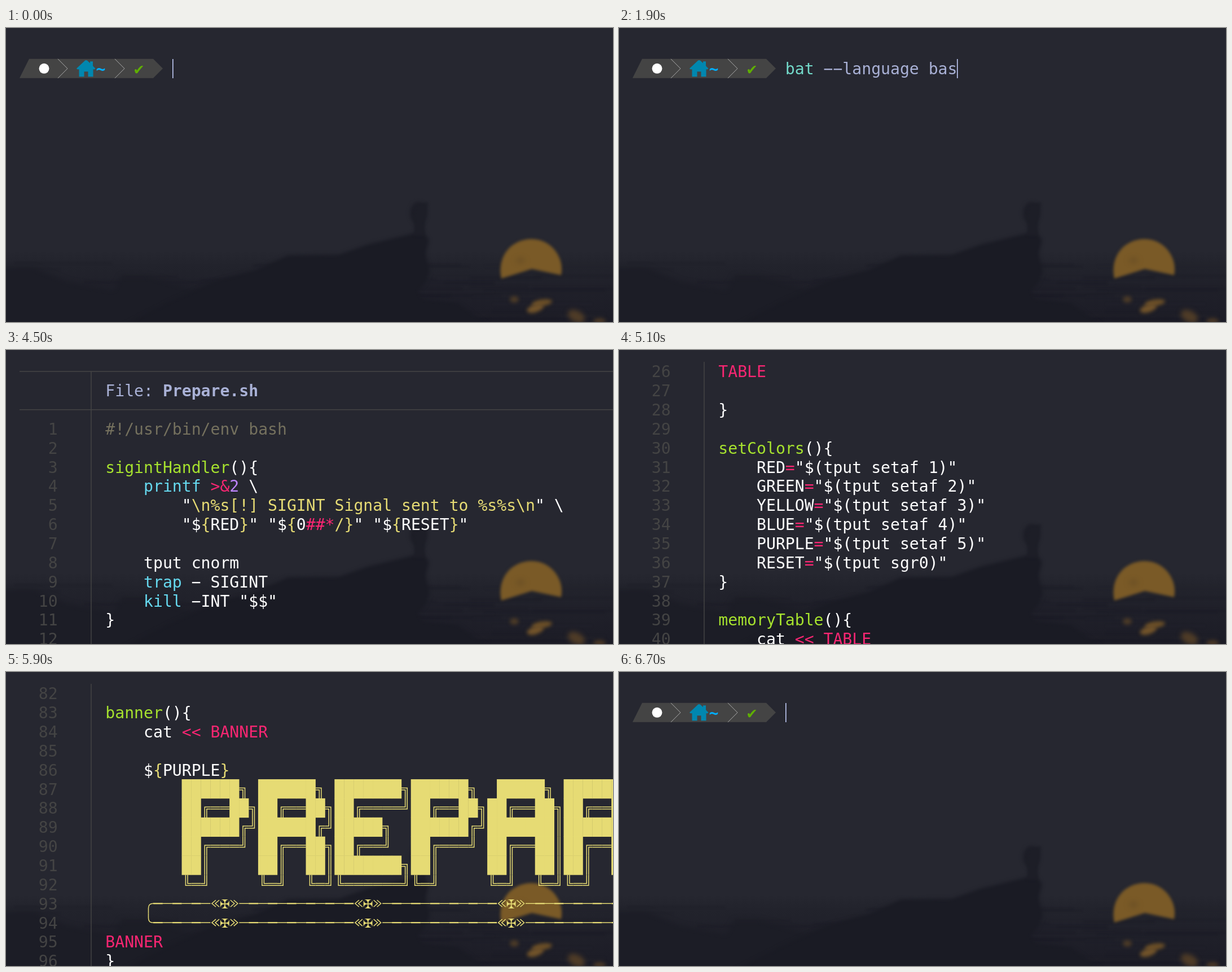
An HTML page with a canvas for the animation above (7600 ms loop, 1076 by 521 pixels).

```html
<!DOCTYPE html>
<html lang="en">
<head>
<meta charset="utf-8">
<title>Terminal</title>
<style>
html, body { margin: 0; width: 100%; height: 100%; overflow: hidden; background: #262730; }
canvas { display: block; }
</style>
</head>
<body>
<canvas id="stage" width="1076" height="521"></canvas>
<script>
const ctx = document.getElementById("stage").getContext("2d");
const WIDTH = 1076, HEIGHT = 521, LOOP = 7600;
const LEFT = 24, TOP = 21, CELL = 16.925, ROW = 33.85;
const FONT = '28.12px "DejaVu Sans Mono", monospace';
const FG = "#a9b1d6", GREY = "#444444";
const COLORS = {
  w: "#ffffff", y: "#e6db74", g: "#a6e22e", c: "#66d9ef", p: "#f92672",
  v: "#be84ff", k: "#75715e", n: GREY, f: FG, t: "#73daca", r: "#f7768e", o: "#5fd700"
};
const colX = col => LEFT + col * CELL;
const rowY = row => TOP + row * ROW;

// ---- Box drawing -------------------------------------------------------

const CORNERS = { "╔": [1, 1], "╗": [-1, 1], "╚": [1, -1], "╝": [-1, -1] };
const TEES = { "╠": 1, "╣": -1 };
const GAP = 1.8;

function stroke(points, width = 1.5) {
  ctx.lineWidth = width;
  ctx.beginPath();
  points.forEach(([x, y]) => ctx.lineTo(x, y));
  ctx.stroke();
}

function drawSymbol(ch, x, y) {
  const cx = x + CELL / 2, cy = y + ROW / 2, right = x + CELL, bottom = y + ROW;
  const bend = (sx, sy, d) => stroke([
    [cx + sx * CELL / 2, cy + sy * d], [cx + sx * d, cy + sy * d], [cx + sx * d, cy + sy * ROW / 2]
  ]);
  if (CORNERS[ch]) {
    bend(...CORNERS[ch], GAP);
    bend(...CORNERS[ch], -GAP);
  } else if (TEES[ch]) {
    const side = TEES[ch];
    bend(side, 1, GAP);
    bend(side, -1, GAP);
    stroke([[cx - side * GAP, y], [cx - side * GAP, bottom]]);
  } else if (ch === "═") {
    for (const d of [-GAP, GAP]) stroke([[x, cy + d], [right, cy + d]]);
  } else if (ch === "║") {
    for (const d of [-GAP, GAP]) stroke([[cx + d, y], [cx + d, bottom]]);
  } else if (ch === "█") {
    ctx.fillRect(x - 0.2, y - 0.2, CELL + 0.4, ROW + 0.4);
  } else if (ch === "─" || ch === "━") {
    stroke([[x, cy], [right, cy]], ch === "─" ? 1.5 : 2.3);
  } else if (ch === "╭" || ch === "╰") {
    const s = ch === "╭" ? 1 : -1;
    ctx.lineWidth = 1.5;
    ctx.beginPath();
    ctx.moveTo(right, cy);
    ctx.quadraticCurveTo(cx, cy, cx, cy + s * 8);
    ctx.lineTo(cx, cy + s * ROW / 2);
    ctx.stroke();
  } else if (ch === "≪" || ch === "≫") {
    const s = ch === "≪" ? 1 : -1;
    for (const d of [-6, 0]) {
      stroke([[cx + s * (d + 7), cy - 6], [cx + s * d, cy], [cx + s * (d + 7), cy + 6]]);
    }
  } else if (ch === "✠") {
    ctx.font = '22px "DejaVu Sans", sans-serif';
    ctx.textAlign = "center";
    ctx.fillText(ch, cx, cy + 8.5);
    ctx.textAlign = "left";
  }
}

// "^x" switches to colour x; every glyph sits in its terminal cell.
function drawText(markup, col, row, weight = "") {
  const font = weight + " " + FONT;
  ctx.font = font;
  for (let i = 0; i < markup.length; i++) {
    let ch = markup[i];
    if (ch === "^") {
      ctx.fillStyle = ctx.strokeStyle = COLORS[markup[++i]];
      continue;
    }
    const x = colX(col++), y = rowY(row);
    if (ch === " ") continue;
    if ("╔╗╚╝╠╣═║█─━╭╰≪≫✠".includes(ch)) {
      drawSymbol(ch, x, y);
      ctx.font = font;
    } else {
      ctx.fillText(ch === "-" ? "−" : ch, x, y + 27.3);
    }
  }
}

// ---- Script shown in the pager -----------------------------------------

const rule = (a, n, b) => "^y" + a + "═".repeat(n) + b;
const define = name => `^g${name}^w(){`;
const entry = text => "^y║ " + text;
const color = (name, code) => `    ^w${name}^p=^w"$(tput ${code})"`;

function table(name, width, body) {
  return [define(name), "    ^wcat ^p<< TABLE", "@BLUE", rule("╔", width, "╗"),
    ...body, rule("╚", width, "╝"), "@RESET", "^pTABLE", "", "^w}", ""];
}

const LETTERS = {
  P: "██████╗ /██╔══██╗/██████╔╝/██╔═══╝ /██║     /╚═╝     ",
  R: "██████╗ /██╔══██╗/██████╔╝/██╔══██╗/██║  ██║/╚═╝  ╚═╝",
  E: "███████╗/██╔════╝/█████╗  /██╔══╝  /███████╗/╚══════╝",
  A: " █████╗ /██╔══██╗/███████║/██╔══██║/██║  ██║/╚═╝  ╚═╝"
};
const bannerRows = Array.from({ length: 6 }, (_, i) =>
  " ".repeat(8) + "^y" + [..."PREPARE"].map(c => LETTERS[c].split("/")[i]).join(""));
const ornament = "━─━─━─" + ("≪✠≫" + "─━".repeat(6)).repeat(3);

const mid = rule("╠", 26, "╣"), inner = rule("║", 26, "║");
const wide = rule("╠", 39, "╣"), config = rule("╠", 41, "╣");

const script = [
  "^k#!/usr/bin/env bash",
  "",
  define("sigintHandler"),
  "    ^cprintf ^p>&^v2 ^w\\",
  '        ^w"^y\\n%s[!] SIGINT Signal sent to %s%s\\n^w" \\',
  '        ^w"@RED^w" "^w$^y{^w0^p##*^y/}^w" "@RESET^w"',
  "",
  "    ^wtput cnorm",
  "    ^ctrap ^w- SIGINT",
  '    ^ckill ^w-INT "$$"',
  "^w}",
  "",
  ...table("systemTable", 39, [
    "^y║          System Information           ║", wide,
    entry("Kernel -> @1"), wide, entry("Distribution -> @2"), wide, entry("Shell -> @3")
  ]),
  define("setColors"),
  color("RED", "setaf 1"), color("GREEN", "setaf 2"), color("YELLOW", "setaf 3"),
  color("BLUE", "setaf 4"), color("PURPLE", "setaf 5"), color("RESET", "sgr0"),
  "^w}",
  "",
  ...table("memoryTable", 26, [
    "^y║       Memory Usage       ║", "^y║" + " ".repeat(26) + "║", inner, mid,
    entry("Total -> @1"), inner, mid, entry("Used -> @2"), inner, mid,
    entry("Free -> @3"), inner, mid, entry("Swappiness -> @4")
  ]),
  ...table("mySQLConfigFileTable", 41, [
    "^y║" + " ".repeat(11) + "Configuration File" + " ".repeat(14) + "║", config,
    entry("Path -> @1"), config, entry("Owner -> @2"), config, entry("Backup -> @3")
  ]),
  "^k# Print the name of the program before every other step is run",
  "^k# and keep the cursor hidden",
  "",
  define("banner"),
  "    ^wcat ^p<< BANNER",
  "",
  "    @PURPLE",
  ...bannerRows,
  "    ^y╭" + ornament,
  "    ^y╰" + ornament,
  "^pBANNER",
  "^w}",
  "",
  define("setSwappiness"),
  '    ^clocal ^wvalue^p=^w"@1^w"',
  "",
  '    ^cprintf ^w"^y%s[+] Setting the swappiness value to %s%s\\n^w" \\',
  '        "@GREEN^w" "@value^w" "@RESET^w"',
  "^w}",
  "",
  define("backupFile"),
  '    ^c[[ ^p-f ^w"@1^w" ^c]] ^p&& ^wcp -- "@1^w" "@1^y.bak^w"',
  "^w}",
  "",
  define("main"),
  "    ^wtput civis",
  "    ^ctrap ^wsigintHandler SIGINT",
  "    ^wbanner",
  "",
  "    ^wmemoryTable",
  "    ^wsetSwappiness 10",
  "    ^wbackupFile /etc/mysql/my.cnf",
  "    ^wmySQLConfigFileTable",
  "",
  '    ^cprintf ^w"^y%s[+] The system has been prepared%s\\n^w" "@GREEN^w" "@RESET^w"',
  "    ^wtput cnorm",
  "^w}",
  "",
  '^wmain "@1^w"',
  ""
].map(line => line.replace(/@(\w+)/g, (_, name) => "^w$^y{^w" + name + "^y}"));

function drawPager(offset) {
  const barX = colX(7.5), ruleY = row => rowY(row + 0.5);
  ctx.strokeStyle = GREY;
  stroke([[barX, offset ? TOP : ruleY(0)], [barX, HEIGHT]]);
  if (!offset) {
    for (const row of [0, 2]) stroke([[LEFT, ruleY(row)], [WIDTH, ruleY(row)]]);
    drawText("^fFile: ", 9, 1);
    drawText("^fPrepare.sh", 15, 1, "bold");
  }
  for (let row = offset ? 0 : 3; row < 15; row++) {
    const number = row + offset - 2;
    if (number > script.length) break;
    drawText("^n" + String(number).padStart(4), 0, row);
    drawText(script[number - 1], 9, row);
  }
}

// ---- Prompt ------------------------------------------------------------

const COMMAND = "bat --language bash -- Prepare.sh", PATH_AT = 23;
// Runs of key presses: first press, number of presses 100 ms apart.
const keyTimes = [
  [200, 6], [900, 3], [1300, 2], [1400, 4], [1700, 4], [2100, 4],
  [2600, 1], [2800, 5], [3600, 1], [4000, 2], [4300, 1]
].flatMap(([start, count]) => Array.from({ length: count }, (_, i) => start + i * 100));

function fillShape(fill, points) {
  ctx.fillStyle = fill;
  ctx.beginPath();
  points.forEach(([x, y]) => ctx.lineTo(x, y));
  ctx.closePath();
  ctx.fill();
}

function drawCommand(count, col, row) {
  const typed = COMMAND.slice(0, count);
  drawText((count < 3 ? "^r" : "^t") + typed.slice(0, 3), col, row, count < 3 ? "bold" : "");
  drawText("^f" + typed.slice(3), col + 3, row);
  if (count > PATH_AT) {
    ctx.fillStyle = FG;
    ctx.fillRect(colX(col + PATH_AT), rowY(row) + 30, (count - PATH_AT) * CELL, 1.6);
  }
}

function drawPrompt(row, count) {
  ctx.save();
  ctx.translate(0, rowY(row) - 55);
  fillShape(GREY, [[24, 89], [41, 55], [261, 55], [278, 72], [261, 89]]);
  ctx.strokeStyle = "#a8a8a8";
  for (const x of [92, 193]) stroke([[x, 55], [x + 17, 72], [x, 89]], 1);
  ctx.fillStyle = "#ffffff";
  ctx.beginPath();
  ctx.arc(67.5, 72, 9, 0, 7);
  ctx.fill();
  fillShape("#0087af", [
    [125, 72], [140.5, 57.5], [143.5, 57.5], [149, 62.5], [149, 59.5], [154, 59.5], [154, 67.5],
    [158.5, 72], [157, 73.5], [154.5, 73.5], [154.5, 86.5], [145.5, 86.5], [145.5, 77.5],
    [138.5, 77.5], [138.5, 86.5], [129.5, 86.5], [129.5, 73.5], [126.5, 73.5]
  ]);
  ctx.font = "bold " + FONT;
  ctx.fillStyle = "#00afff";
  ctx.fillText("~", colX(8), 82.3);
  ctx.font = FONT;
  ctx.fillStyle = "#5faf00";
  ctx.fillText("✔", colX(12), 82.3);
  ctx.restore();
  drawCommand(count, 16, row);
  ctx.fillStyle = "#c0caf5";
  ctx.fillRect(Math.round(colX(16 + count)), Math.round(rowY(row)), 1.6, 34);
}

// ---- Backdrop ----------------------------------------------------------

function paintBackdrop() {
  const canvas = document.createElement("canvas");
  canvas.width = WIDTH;
  canvas.height = HEIGHT;
  const g = canvas.getContext("2d");
  const polygon = (fill, blur, points) => {
    g.filter = `blur(${blur}px)`;
    g.fillStyle = fill;
    g.beginPath();
    points.forEach(([x, y]) => g.lineTo(x, y));
    g.fill();
  };
  const blob = (fill, blur, x, y, rx, ry, turn = 0) => {
    g.filter = `blur(${blur}px)`;
    g.fillStyle = fill;
    g.beginPath();
    g.ellipse(x, y, rx, ry, turn, 0, 7);
    g.fill();
  };

  g.fillStyle = "#262730";
  g.fillRect(0, 0, WIDTH, HEIGHT);
  const sea = g.createLinearGradient(0, 395, 0, HEIGHT);
  sea.addColorStop(0, "#22232c00");
  sea.addColorStop(0.2, "#22232c");
  sea.addColorStop(1, "#1c1c26");
  g.fillStyle = sea;
  g.fillRect(0, 395, WIDTH, HEIGHT - 395);

  let seed = 7;
  const random = () => (seed = seed * 16807 % 2147483647) / 2147483647;
  g.filter = "blur(1.5px)";
  for (let i = 0; i < 60; i++) {
    g.fillStyle = i % 3 ? "rgba(26,27,36,.28)" : "rgba(38,39,48,.22)";
    g.fillRect(random() * 1000 - 60, 415 + random() * 105, 60 + random() * 180, 2 + random() * 4);
  }

  polygon("#1c1d26", 5, [[-10, 425], [50, 425], [110, 450], [190, 465], [205, 440], [250, 440],
    [330, 462], [420, 440], [500, 470], [500, 531], [-10, 531]]);
  polygon("#1a1b24", 3, [[380, 446], [445, 428], [500, 403], [590, 402], [640, 384], [722, 364],
    [738, 359], [750, 376], [744, 400], [751, 432], [743, 452], [730, 466], [738, 480],
    [800, 487], [860, 531], [200, 531], [300, 480]]);
  blob("#1d1e27", 3, 731, 328, 15, 19);
  polygon("#1d1e27", 2, [[727, 312], [748, 309], [743, 340], [742, 368], [724, 368], [723, 335]]);

  g.filter = "blur(2.5px)";
  g.fillStyle = "#7a5a27";
  g.beginPath();
  g.moveTo(878, 444);
  g.bezierCurveTo(870, 405, 895, 374, 932, 374);
  g.bezierCurveTo(967, 374, 991, 408, 984, 438);
  g.lineTo(932, 427);
  g.fill();
  blob("rgba(95,70,34,.4)", 4, 912, 412, 9, 6);
  blob("#4b3a27", 3, 901, 481, 8, 6);
  blob("#6b4f27", 3, 950, 487, 18, 6, -0.15);
  blob("#71532a", 3, 938, 497, 15, 7, -0.3);
  blob("#4f3c27", 4, 1011, 511, 16, 10, 0.5);
  blob("#493826", 3, 1052, 519, 11, 5);
  return canvas;
}

// ---- Timeline ----------------------------------------------------------

const PAGE_ROWS = 14;
const pageTimes = [4500, 4900, 5100, 5300, 5400, 5600, 5900, 6100, 6300];
const backdrop = paintBackdrop();
const passed = (times, t) => times.filter(time => time <= t).length;

function render(t) {
  ctx.drawImage(backdrop, 0, 0);
  if (t < 4500) {
    drawPrompt(1, passed(keyTimes, t));
  } else if (t < 6500) {
    drawPager((passed(pageTimes, t) - 1) * PAGE_ROWS);
  } else if (t < 6700) {
    drawText("^o❯", 0, 0);
    drawCommand(COMMAND.length, 2, 0);
    drawPrompt(2, 0);
  } else {
    drawPrompt(1, 0);
  }
}

const start = performance.now();
function tick() {
  render((performance.now() - start) % LOOP);
  requestAnimationFrame(tick);
}
tick();
</script>
</body>
</html>
```
